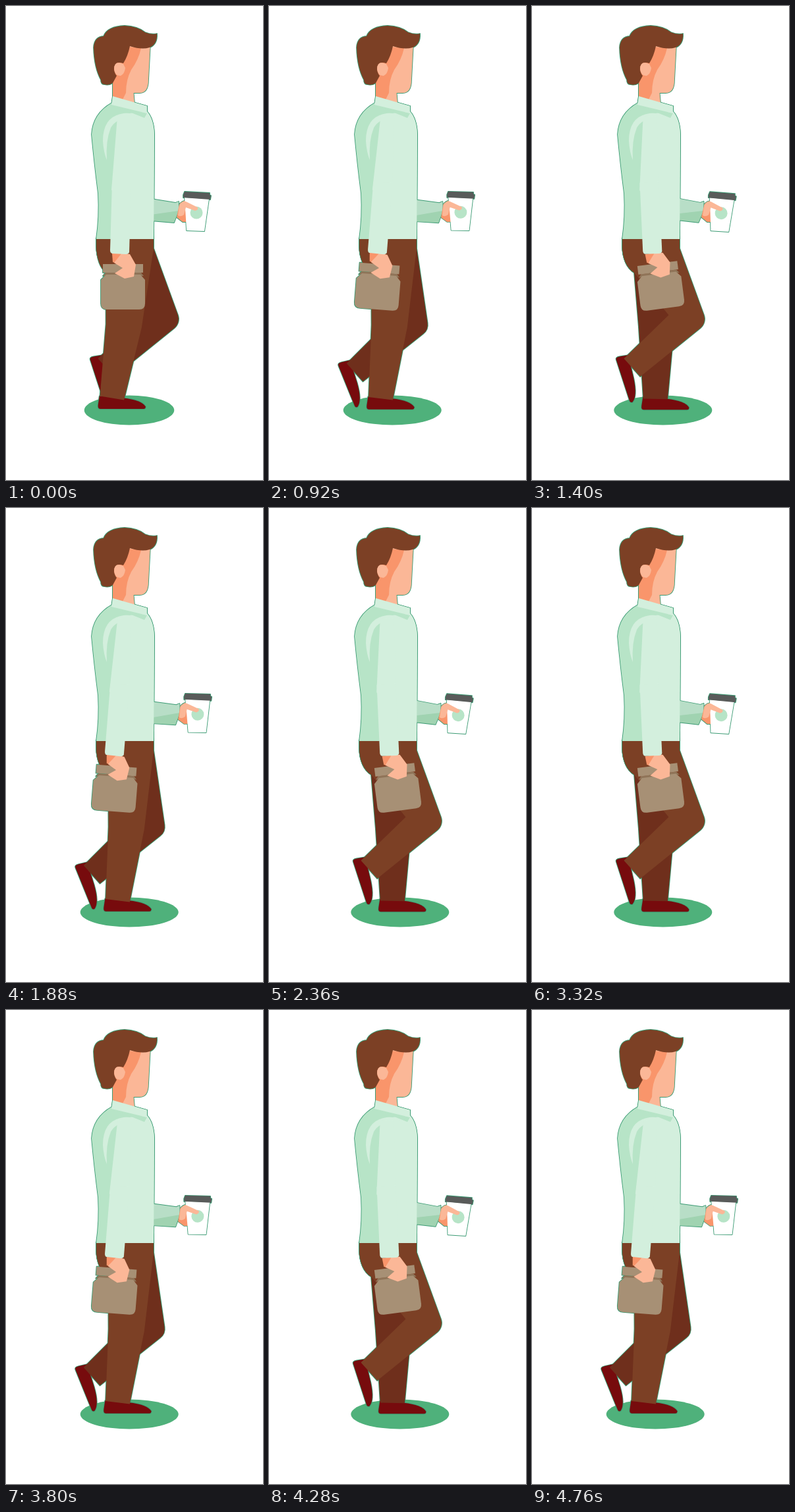
Animation, 390 px wide and 720 px high, one loop 4.8 s. Source, as an HTML page with a canvas:

```html
<!DOCTYPE html>
<html lang="en">
<head>
<meta charset="utf-8">
<title>Walking to work</title>
<style>
  html, body { margin: 0; width: 100%; height: 100%; overflow: hidden; background: #fff; }
  canvas { display: block; width: 390px; height: 720px; }
</style>
</head>
<body>
<canvas id="stage"></canvas>
<script>
const canvas = document.getElementById('stage');
const ctx = canvas.getContext('2d');
const scale = window.devicePixelRatio || 1;
canvas.width = 390 * scale;
canvas.height = 720 * scale;

const CYCLE = 960, STEP = 40, FAR_LEAD = 440;
const RAD = Math.PI / 180;
const HIP = { x: 184, y: 365 }, THIGH = 121, SHANK = 111;
const C = {
  edge: '#3c9b74', shadow: '#4fb17b', brown: '#7c4025', dark: '#6f2f1c', shoe: '#770b0d',
  skin: '#fbb797', tan: '#f9956b', light: '#d3efdd', mint: '#b7e4c7',
  sleeveTop: '#b8dec7', sleeveLow: '#a0d3b1', bag: '#a79075', bagDark: '#8f7458',
  lid: '#595b5a', white: '#ffffff'
};

// time, thigh angle, shank angle, foot angle (degrees; positive swings forward)
const GAIT = [
  [0, -2.4, -9.4, 0], [120, -10, -18, 3], [240, -19, -35, 28],
  [320, -10, -52, 57], [400, 13.7, -48, 68], [440, 24.6, -48, 72],
  [520, 33, -25, 32], [600, 31, 5, -6], [680, 24, 15, -16],
  [760, 15, 11, 0], [880, 2.5, -1, 0], [920, -0.5, -7, 0]
];

const path = d => new Path2D(d);
const P = {
  shoe: path('M-19-3L17 0Q45 3 51 13Q51 16.5 48 16.5H-18Q-22 16.5-21 10Z'),
  torso: path('M161 147Q132 163 130 195Q134 238 140 285Q142 320 137 354H224L225 195Q224 171 214 161V152L162 138Z'),
  front: path('M170 165L214 160Q224 171 225 195L224 354H178L169 270Z'),
  gleam: path('M211 170Q190 160 174 164Q147 170 147 205Q148 222 153 234Q151 205 159 185Q167 171 190 168Z'),
  collar: path('M162 137L214 152V163L160 150Z'),
  fold: path('M160 150L214 163L210 170Z'),
  neck: path('M162 112L193 125L195 148L162 138Z'),
  face: path('M186 58L219 57L216 112Q216 132 203 132H183L162 124L165 86Z'),
  cheek: path('M186 62L205 64Q201 82 190 97Q182 112 182 132L177 142L162 138V112L165 84Z'),
  ear: path('M178 88Q164 82 164 96Q165 106 174 106Q180 103 181 94Z'),
  hair: path('M133 63Q134 47 148 46Q154 31 180 30Q200 31 211 40Q221 44 229 42Q230 58 218 63Q206 67 188 61Q185 76 178 87Q164 83 164 96Q165 103 168 106L162 117Q156 121 149 119Q144 119 144 112Q134 94 133 63Z'),
  foreTop: path('M220 293L257 299L262 297V312L220 318Z'),
  foreLow: path('M220 317L262 311L255 329L220 326Z'),
  palm: path('M263 301Q270 294 275 297L277 328L268 328L259 321Z'),
  thumb: path('M263 302Q268 294 275 298L291 306Q292 310 287 311L273 306L270 317Q265 321 261 318Z'),
  lid: path('M271 282L309 284V287L311 288L310 294L269 291V287Z'),
  cup: path('M271 291L308 293L301 342L274 341Z'),
  dot: path('M279.5 314a9.5 9.5 0 1 0 19 0a9.5 9.5 0 1 0-19 0'),
  upper: path('M169 168L190 168L190 280L160 280Z'),
  fore: path('M161 268L190 268L187 374Q186 377 182 377L161 376Q158 375 158 371Z'),
  strap: path('M147 392H208V405H147Z'),
  gusset: path('M151 405H205L209 410H147Z'),
  bag: path('M152 408H204L211 416V452Q211 461 202 461H153Q144 461 144 452V416Z'),
  wrist: path('M161 376L178 375L176 394L162 389Z'),
  hand: path('M176 375L188 377L197 393L194 411L180 414L165 406L177 398L164 390Z')
};

let outlining = false;

function paint(shape, color) {
  if (outlining) ctx.stroke(shape);
  else {
    ctx.fillStyle = color;
    ctx.fill(shape);
  }
}

function turn(x, y, deg) {
  ctx.translate(x, y);
  ctx.rotate(deg * RAD);
  ctx.translate(-x, -y);
}

function group(draw) {
  ctx.save();
  draw();
  ctx.restore();
}

// Periodic cubic through the gait keys
function gait(time) {
  const n = GAIT.length;
  const key = i => {
    const turns = Math.floor(i / n), k = GAIT[i - turns * n];
    return [k[0] + turns * CYCLE, ...k.slice(1)];
  };
  const t = time % CYCLE;
  let i = n - 1;
  while (GAIT[i][0] > t) i--;
  const [a, b, c, d] = [key(i - 1), key(i), key(i + 1), key(i + 2)];
  const h = c[0] - b[0], u = (t - b[0]) / h;
  return [1, 2, 3].map(j => {
    const m0 = h * (c[j] - a[j]) / (c[0] - a[0]);
    const m1 = h * (d[j] - b[j]) / (d[0] - b[0]);
    return b[j] + u * (m0 + u * (3 * (c[j] - b[j]) - 2 * m0 - m1
      + u * (2 * (b[j] - c[j]) + m0 + m1)));
  });
}

const along = (p, deg, len) => ({
  x: p.x + len * Math.sin(deg * RAD), y: p.y + len * Math.cos(deg * RAD)
});
// Point in front of (positive) or behind a limb pointing down at an angle
const beside = (p, deg, len) => ({
  x: p.x + len * Math.cos(deg * RAD), y: p.y - len * Math.sin(deg * RAD)
});

function leg(time, color) {
  const [thigh, shank, foot] = gait(time);
  const knee = along(HIP, thigh, THIGH), ankle = along(knee, shank, SHANK);
  const mid = (thigh + shank) / 2, bend = Math.abs(thigh - shank) * RAD;
  const kneeFront = beside(knee, mid, 26.5 + bend * 4), kneeBack = beside(knee, mid, -27.5);
  const hemFront = beside(ankle, shank, 18.5), hemBack = beside(ankle, shank, -18.5);
  const seat = Math.max(138, Math.min(155, kneeBack.x));

  group(() => {
    ctx.translate(ankle.x - 3 * Math.sin(foot * RAD), ankle.y);
    ctx.rotate(foot * RAD);
    paint(P.shoe, C.shoe);
  });

  const s = new Path2D();
  s.moveTo(137, 353);
  s.lineTo(224, 353);
  s.lineTo(224, 368);
  s.arcTo(kneeFront.x, kneeFront.y, hemFront.x, hemFront.y, 18);
  s.lineTo(hemFront.x, hemFront.y);
  s.lineTo(hemBack.x, hemBack.y);
  s.lineTo(kneeBack.x, kneeBack.y);
  s.lineTo(seat, 405);
  s.quadraticCurveTo(138, 394, 137, 364);
  s.closePath();
  paint(s, color);
}

// Trousers seat, shared by both legs
const seatShape = path('M137 353H224V372L200 405H155Q138 394 137 364Z');

function farArm(swing) {
  group(() => {
    ctx.translate(-7 * swing, 0);
    turn(264, 312, 6 * swing);
    paint(P.foreTop, C.sleeveTop);
    paint(P.foreLow, C.sleeveLow);
    paint(P.palm, C.tan);
    paint(P.cup, C.white);
    paint(P.lid, C.lid);
    paint(P.dot, C.mint);
    paint(P.thumb, C.skin);
  });
}

function nearArm(swing) {
  group(() => {
    turn(174, 180, -7 * swing);
    paint(P.upper, C.light);
    turn(175, 275, -7 * swing - 2.5 * Math.abs(swing));
    group(() => {
      turn(173, 376, -9 * swing - 3 * Math.abs(swing));
      paint(P.gusset, C.bagDark);
      paint(P.strap, C.bag);
      paint(P.bag, C.bag);
      paint(P.wrist, C.tan);
      paint(P.hand, C.skin);
    });
    paint(P.fore, C.light);
  });
}

function body() {
  paint(P.neck, C.skin);
  paint(P.face, C.skin);
  paint(P.cheek, C.tan);
  paint(P.hair, C.brown);
  paint(P.ear, C.skin);
  paint(P.torso, C.mint);
  paint(P.front, C.light);
  paint(P.gleam, C.light);
  paint(P.fold, C.mint);
  paint(P.collar, C.light);
}

function walker(t, swing) {
  farArm(swing);
  leg(t + FAR_LEAD, C.dark);
  paint(seatShape, C.brown);
  leg(t, C.brown);
  body();
  nearArm(swing);
}

function shadow(t) {
  const angle = 2 * Math.PI / CYCLE;
  const width = 199 - 63 * Math.cos(2 * angle * (t - 10));
  const x = 193 - 6 * Math.cos(angle * t);
  ctx.fillStyle = C.shadow;
  ctx.beginPath();
  ctx.ellipse(x, 614, width / 2, 22.5, 0, 0, 2 * Math.PI);
  ctx.fill();
}

function render(t) {
  const swing = Math.sin(2 * Math.PI * t / CYCLE);
  const bob = Math.round(4 * (1 - Math.cos(4 * Math.PI * (t + 20) / CYCLE)));
  ctx.setTransform(scale, 0, 0, scale, 0, 0);
  ctx.fillStyle = C.white;
  ctx.fillRect(0, 0, 390, 720);
  shadow(t);
  ctx.translate(0, bob);
  ctx.strokeStyle = C.edge;
  ctx.lineWidth = 1.8;
  ctx.lineJoin = 'round';
  outlining = true;
  walker(t, swing);
  outlining = false;
  walker(t, swing);
}

const start = performance.now();
function tick() {
  const t = performance.now() - start;
  render(Math.floor(t / STEP) * STEP % CYCLE);
  requestAnimationFrame(tick);
}
tick();
</script>
</body>
</html>
```
